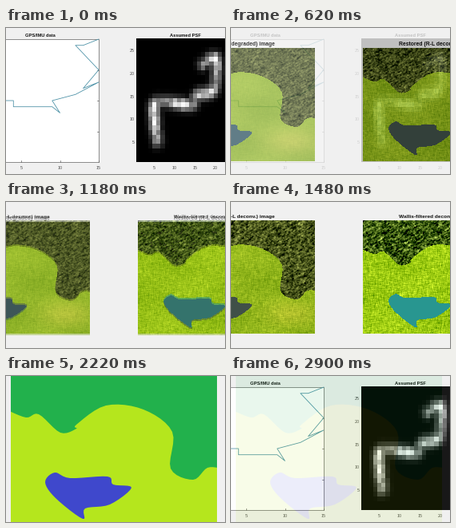
A matplotlib script that plays this animation: 274 px wide and 183 px high, repeating every 2960 ms.

```python
import numpy as np
import matplotlib.pyplot as plt
from matplotlib.animation import FuncAnimation
from matplotlib.patches import Polygon, Rectangle
from matplotlib.path import Path

W, H, DPI = 274, 183, 100
PX = 72 / DPI                      # points per pixel
STEP, HOLD, FADE, SCENE = 20, 200, 60, 740
PHOTO_W, PHOTO_H = 189, 142
MAP_X, MAP_Y, MAP_W = 5, -6, 260   # label map, slightly taller than the stage
SCALE = PHOTO_W / MAP_W
LEFT, RIGHT = 105 - PHOTO_W, 165   # left edges of the two photos

plt.rcParams["font.family"] = "Liberation Sans"
fig = plt.figure(figsize=(W / DPI, H / DPI), dpi=DPI, facecolor="#f0f0f0")
ax = fig.add_axes([0, 0, 1, 1])


def curve(pts, closed=False, n=6):
    """Catmull-Rom curve through the points."""
    p = np.array(pts, float)
    ends = (p[-1:], p[:2]) if closed else (p[:1], p[-1:])
    q = np.vstack([ends[0], p, ends[1]])
    t = np.linspace(0, 1, n, endpoint=False)[:, None]
    parts = [b + t / 2 * (c - a + t * (2 * a - 5 * b + 4 * c - d + t * (3 * (b - c) + d - a)))
             for a, b, c, d in zip(q, q[1:], q[2:], q[3:])]
    return np.vstack(parts + [p[:1] if closed else p[-1:]])


TREELINE = curve([(0, 42), (25, 52), (41, 48), (68, 71), (88, 66), (88, 61), (125, 37),
                  (172, 42), (208, 70), (206, 116), (234, 130), (252, 115), (270, 116)])
FOREST = np.vstack([[(0, -40)], TREELINE, [(270, -40)]])
LAKE = curve([(49, 133), (61, 121), (80, 128), (127, 126), (134, 136), (157, 140),
              (130, 161), (99, 166), (96, 179), (62, 153)], closed=True)


def rgb(color):
    return 255 * np.array(plt.matplotlib.colors.to_rgb(color))


def reset():
    ax.clear()
    ax.axis("off")
    frame_axes()


def frame_axes():
    ax.set(xlim=(0, W), ylim=(H, 0))
    ax.set_aspect("auto")


def snapshot():
    frame_axes()
    fig.canvas.draw()
    return np.asarray(fig.canvas.buffer_rgba())[..., :3].astype(float)


def show(img):
    return ax.imshow(img.astype(np.uint8), aspect="auto", interpolation="nearest",
                     extent=(0, W, H, 0))


def label(x, y, s, size=5.8, ha="center", weight="bold", color="#111111"):
    ax.text(x, y, s, size=size * PX, ha=ha, va="center_baseline",
            weight=weight, color=color)


def tick(x, y, n, ha="center"):
    label(x, y, n, 5.4, ha, "normal", "#505050")


# ---- path and point spread function
def psf():
    """Blurred camera track on a 25 x 27 grid of cells, with uneven gain."""
    rng = np.random.default_rng(4)
    c, r = curve([(5.7, 5), (5, 10.5), (5.8, 13.6), (14, 13), (15.5, 15), (19.6, 16.5),
                  (20, 23), (16.9, 21.8)], n=20).T
    cols, rows = np.meshgrid(np.arange(1, 26), np.arange(1, 28))
    d2 = (cols[..., None] - c) ** 2 + (rows[..., None] - r) ** 2
    gain = .72 + .2 * np.sin(c * .8 + r * .5 - 1.5)
    return (gain * np.exp(-d2 / 1.6)).max(axis=-1) * rng.uniform(.8, 1.2, cols.shape)


def draw_paths():
    reset()
    dx, dy, x_zero, y_top = 9.7, 7.7, -29.5, 14
    gray = dict(color="#606060", lw=.5)
    ax.add_patch(Rectangle((-30, y_top), 146, 154, fc="white", ec="#606060", lw=.5))
    for n in (5, 10, 15):
        x = x_zero + n * dx
        ax.plot([x, x], [168, 166], **gray)
        ax.plot([114, 116], [y_top + n * dy] * 2, **gray)
        tick(x, 175, n)
    route = np.array([(2, 10), (4, 10), (4, 11), (9, 11), (10, 12), (9, 10), (12, 9),
                      (15, 7), (13, 8), (15, 5), (12, 1), (13, 1), (15, 0)])
    ax.plot(x_zero + dx * route[:, 0], y_top + dy * route[:, 1], color="#4f93a8", lw=.6)

    ax.imshow(psf(), cmap="gray", vmin=0, vmax=1, origin="lower", aspect="auto",
              interpolation="nearest", extent=(163, 290, 168.5, 13.5))
    for n in range(5, 26, 5):
        tick(159.4 + 5.12 * n, 175, n)
        tick(160.5, 171.5 - 5.72 * n, n, "right")
    label(43, 9, "GPS/IMU data")
    label(224, 9, "Assumed PSF")
    return snapshot()


# ---- aerial photos, from soft (level 0) to strongly sharpened (level 2)
LOOKS = [dict(forest="#525c2e", field="#96b83a", lake="#3a5c69"),
         dict(forest="#48541c", field="#92b61c", lake="#405048"),
         dict(forest="#3a5810", field="#9cca12", lake="#289690")]


def grain(rng, h, w, slant=0):
    """Unit-variance noise smeared over an h x w cell."""
    n = rng.standard_normal((H, W))
    n = sum(np.roll(n, (i, j - slant * i), axis=(0, 1)) for i in range(h) for j in range(w))
    return n / n.std()


def photo(canvas, x0, y0, level):
    rng = np.random.default_rng(level)
    look = {name: rgb(color) for name, color in LOOKS[level].items()}
    x, y = np.meshgrid(np.arange(W) + .5, np.arange(H) + .5)
    u, v = (x - x0) / SCALE + MAP_X, (y - y0) / SCALE + MAP_Y
    uv = np.column_stack([u.ravel(), v.ravel()])
    trees, water = (Path(p).contains_points(uv).reshape(H, W, 1) for p in (FOREST, LAKE))

    weave = (grain(rng, 1, 4) + grain(rng, 4, 1)) * (2 + 6 * level)
    patches = 6 * np.sin(u / 23 + v / 31) + 4 * np.sin(v / 11 - u / 40)
    dry = 24 * np.exp(-((u - 225) / 45) ** 2 - ((v - 155) / 22) ** 2)
    meadow = look["field"] + (weave + patches)[..., None] * (1, .8, .5) \
        + dry[..., None] * (1, .2, .5)
    clump = (grain(rng, 3, 3, 1) + grain(rng, 2, 2)) * (13 + 9 * level)
    wood = look["forest"] + clump[..., None] * (1, 1, .6)

    img = np.where(water, look["lake"], np.where(trees, wood, meadow))
    inside = (x > x0) & (x < x0 + PHOTO_W) & (y > y0) & (y < y0 + PHOTO_H)
    canvas[inside] = np.clip(img, 0, 255)[inside]


def draw_photos(level, top, size, left, right):
    reset()
    canvas = np.full((H, W, 3), 240.0)
    photo(canvas, LEFT, top, level)
    photo(canvas, RIGHT, top, level + 1)
    show(canvas)
    label(55, top - 5.2, left, size, "right")
    label(210.5, top - 5.2, right, size, "left")
    return snapshot()


# ---- label map
def draw_map():
    reset()
    land = ax.add_patch(Rectangle((6, -5), 258, 195, fc="#b5e61d", lw=0))
    for shape, color in ((FOREST, "#22b14c"), (LAKE, "#3f48cc")):
        area = ax.add_patch(Polygon(shape, fc=color, lw=0))
        area.set_clip_path(land)
    return snapshot()


scenes = [
    draw_paths(),
    draw_photos(0, 25, 6.8, "(degraded) image", "Restored (R-L deconv.) image"),
    draw_photos(1, 23, 6.5, "(R-L deconv.) image", "Wallis-filtered deconv. image"),
    draw_map(),
]

reset()
view = show(scenes[0])
frame_axes()


def update(i):
    k, t = divmod(i * STEP, SCENE)
    mix = 0 if t < HOLD else ((t - HOLD) // FADE + 1) / 10
    img = (1 - mix) * scenes[k] + mix * scenes[(k + 1) % len(scenes)]
    view.set_data(np.round(img).astype(np.uint8))
    return [view]


anim = FuncAnimation(fig, update, frames=len(scenes) * SCENE // STEP,
                     interval=STEP, repeat=True, repeat_delay=0)
plt.show()
```
